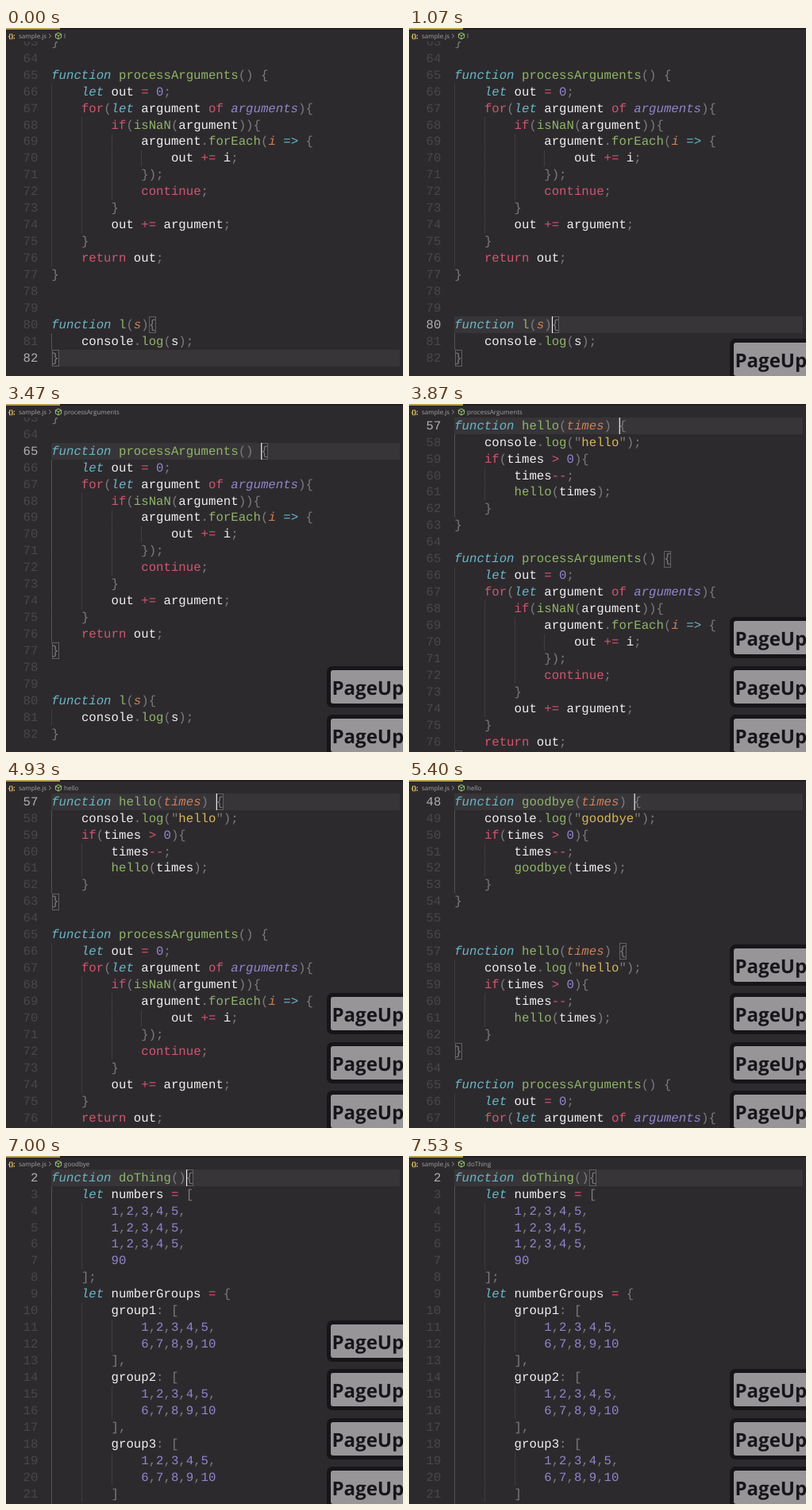
Write an HTML page with a canvas that moves like this. It is 500 by 438 pixels and loops after 8 s.

```html
<!DOCTYPE html>
<html lang="en">
<head>
<meta charset="utf-8">
<title>Jumping between functions</title>
<style>
  html, body { margin: 0; width: 100%; height: 100%; overflow: hidden; background: #2d2a2e; }
  canvas { display: block; width: 500px; height: 438px; }
</style>
</head>
<body>
<canvas id="stage" width="500" height="438"></canvas>
<script>
const ctx = document.getElementById('stage').getContext('2d');
const W = 500, H = 438, LOOP = 8000;
const LEFT = 57.2, CHAR = 9.42, ROW = 20.94, TOP = 17, BASE = 14.7;
const MONO = '15.7px "Liberation Mono", "Courier New", monospace';
const SANS = '"Open Sans", "Noto Sans", sans-serif';
// Syntax colours, toned down for the light strokes of the code
const BG = '#2d2a2e', WHITE = '#f0f0ee', GRAY = '#7d7b7d', PINK = '#d2566f',
  ORANGE = '#cf7f57', YELLOW = '#d8b75b', GREEN = '#8fb567', CYAN = '#68b9c7', PURPLE = '#9086cc';

const counter = name => `function ${name}(times) {
    console.log("${name}");
    if(times > 0){
        times--;
        ${name}(times);
    }
}
`;
const group = n => `        group${n}: [
            1,2,3,4,5,
            6,7,8,9,10
        ]`;

const code = {};
function addCode(first, text) {
  text.split('\n').forEach((line, i) => { code[first + i] = line; });
}
addCode(2, `function doThing(){
    let numbers = [
        1,2,3,4,5,
        1,2,3,4,5,
        1,2,3,4,5,
        90
    ];
    let numberGroups = {
${[1, 2, 3].map(group).join(',\n')}
    };`);
addCode(48, counter('goodbye') + '\n');
addCode(57, counter('hello'));
addCode(65, `function processArguments() {
    let out = 0;
    for(let argument of arguments){
        if(isNaN(argument)){
            argument.forEach(i => {
                out += i;
            });
            continue;
        }
        out += argument;
    }
    return out;
}


function l(s){
    console.log(s);
}`);

// Each token rule: pattern, colour, italic
const rules = [
  ['(?:function|let)\\b', CYAN, true],
  ['(?:for|of|if|continue|return)\\b', PINK],
  ['arguments\\b', PURPLE, true],
  ['i(?= =>)|(?<=function \\w+\\()\\w+', ORANGE, true],
  ['(?<=")\\w+(?=")', YELLOW],
  ['[a-zA-Z]\\w*(?=\\()', GREEN],
  ['[a-zA-Z]\\w*', WHITE],
  ['\\d+', PURPLE],
  ['=>', CYAN],
  ['[-+=<>]+', PINK],
  ['[^\\w\\s]', GRAY]
];
const lexer = new RegExp(rules.map(r => `(${r[0]})`).join('|'), 'g');
const tokens = {};
for (const n in code) {
  tokens[n] = [...code[n].matchAll(lexer)].map(m => {
    const rule = rules[m.slice(1).findIndex(g => g !== undefined)];
    return { text: m[0], col: m.index, color: rule[1], italic: rule[2] };
  });
}

// Caret stops; bracket boxes and the breadcrumb follow a little later
const stops = [
  { at: 0, line: 82, col: 1, first: 63.47, name: 'l', block: [80, 82], open: 13 },
  { at: 1070, line: 80, col: 13, first: 63.47, name: 'l', block: [80, 82], open: 13 },
  { at: 2470, line: 65, col: 28, first: 63.47, name: 'processArguments', block: [65, 77], open: 28 },
  { at: 3870, line: 57, col: 22, first: 57, name: 'hello', block: [57, 63], open: 22 },
  { at: 5400, line: 48, col: 24, first: 48, name: 'goodbye', block: [48, 54], open: 24 },
  { at: 6870, line: 2, col: 18, first: 2, name: 'doThing', block: [2, 46], open: 18, late: 260 }
];
const caretOff = [[0, 470], [930, 1070], [1600, 2130], [2930, 3470], [4400, 4930], [5870, 6400], [7470, 8000]];
// Key presses: shown, fading
const presses = [[1070, 6130], [2470, 7470], [3870, 8900], [5400, 10400], [6870, 11900]];

const stopAt = (t, delay = () => 0) =>
  stops.reduce((found, s) => (s.at === 0 || t >= s.at + delay(s) ? s : found), stops[0]);
const colX = col => LEFT + col * CHAR;

function rect(x, y, w, h, color) {
  ctx.fillStyle = color;
  ctx.fillRect(x, y, w, h);
}

function write(text, x, y, color, font) {
  ctx.font = font;
  ctx.fillStyle = color;
  ctx.fillText(text, x, y);
}

function path(points, color, width) {
  ctx.beginPath();
  points.forEach(([x, y], i) => (i ? ctx.lineTo(x, y) : ctx.moveTo(x, y)));
  ctx.strokeStyle = color;
  ctx.lineWidth = width;
  ctx.stroke();
}

function roundBox(x, y, w, h, r, color) {
  ctx.beginPath();
  ctx.roundRect(x, y, w, h, r);
  ctx.fillStyle = color;
  ctx.fill();
}

function drawBracketBox(y, col) {
  const x = Math.round(colX(col) + 0.3), top = Math.round(y);
  rect(x, top, 9, 21, BG);
  ctx.strokeStyle = '#626061';
  ctx.lineWidth = 1;
  ctx.strokeRect(x + 0.5, top + 0.5, 8, 20);
}

function drawLine(n, y, stop) {
  const active = n === stop.line;
  ctx.textAlign = 'right';
  write(n, 40.3, y + BASE, active ? '#b0afaf' : '#4a474b', MONO);
  ctx.textAlign = 'left';

  const depth = code[n].search(/\S/) / 4;
  for (let d = 0; d < depth; d++) {
    const inside = d === 0 && n > stop.block[0] && n < stop.block[1];
    rect(Math.round(colX(d * 4)), y, 1, ROW, inside ? '#545155' : '#403d41');
  }
  for (const k of tokens[n]) {
    write(k.text, colX(k.col), y + BASE, k.color, (k.italic ? 'italic ' : '') + MONO);
  }
}

function drawEditor(t) {
  const stop = stopAt(t);
  const boxes = stopAt(t, () => 60);
  const lineY = n => TOP + (n - stop.first) * ROW;

  ctx.save();
  ctx.beginPath();
  ctx.rect(0, TOP, W, H - TOP);
  ctx.clip();
  rect(57, Math.round(lineY(stop.line)), 439, 21, '#383539');
  drawBracketBox(lineY(boxes.block[0]), boxes.open);
  drawBracketBox(lineY(boxes.block[1]), 0);
  for (let n = Math.floor(stop.first); n <= stop.first + 21; n++) {
    if (n in code) drawLine(n, lineY(n), stop);
  }
  if (!caretOff.some(([a, b]) => t >= a && t < b)) {
    rect(colX(stop.col) + 0.3, Math.round(lineY(stop.line)), 1.1, 21, '#fcfcfa');
  }
  ctx.restore();
}

function drawHeader(t) {
  const name = stopAt(t, s => s.late || 130).name;
  rect(0, 0, W, 2, '#221f22');
  rect(0, 0, 68, 2, '#b89d50');
  write('{};', 3, 12.7, '#ffd866', 'bold 8px ' + SANS);
  write('sample.js', 16, 13, '#a3a1a3', '8px ' + SANS);
  path([[54, 7.5], [56.8, 10], [54, 12.5]], '#939293', 0.9);
  path([[66, 6], [69.6, 7.8], [69.6, 12], [66, 14], [62.4, 12], [62.4, 7.8], [66, 6]], '#a9dc76', 0.9);
  path([[62.4, 7.8], [66, 9.7], [69.6, 7.8]], '#a9dc76', 0.8);
  path([[66, 9.7], [66, 14]], '#a9dc76', 0.8);
  write(name, 73, 13, '#a3a1a3', '8px ' + SANS);
}

function drawKeys(t) {
  const shown = presses.filter(([on, fade]) => t >= on && t < fade + 60).reverse();
  shown.forEach(([, fade], i) => {
    const y = Math.round(391.3 - i * 61.6);
    ctx.globalAlpha = t >= fade ? 0.5 : 1;
    roundBox(404, y, 130, 52, 7, '#171519');
    roundBox(409, y + 5, 120, 42, 3, '#989599');
    write('PageUp', 410.5, y + 36, '#171519', 'bold 24px ' + SANS);
    ctx.globalAlpha = 1;
  });
}

function draw(t) {
  rect(0, 0, W, H, BG);
  drawEditor(t);
  drawHeader(t);
  drawKeys(t);
}

ctx.textRendering = 'geometricPrecision';
const start = performance.now();
function tick() {
  draw((performance.now() - start) % LOOP);
  requestAnimationFrame(tick);
}
tick();
</script>
</body>
</html>
```
